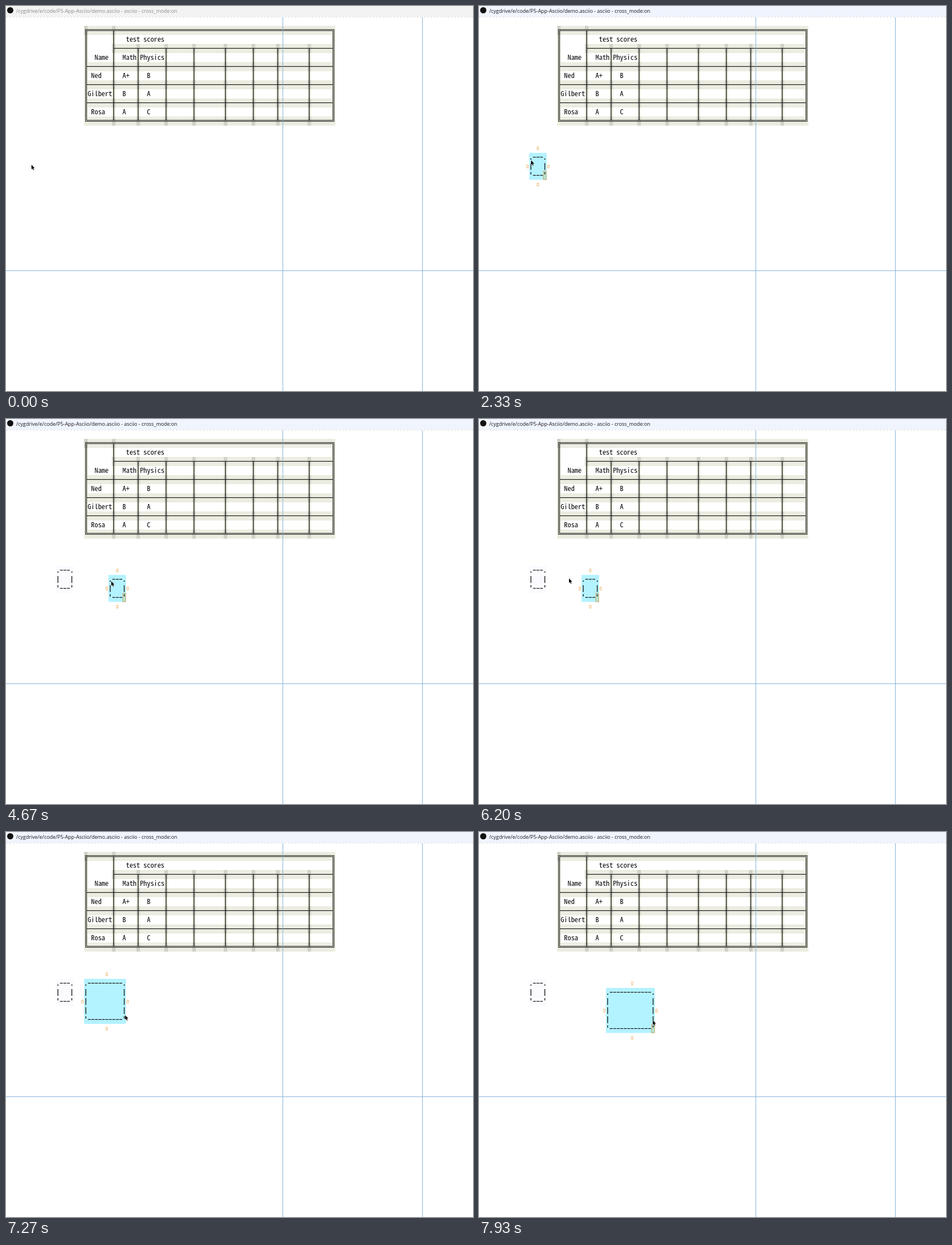
Recreate the animation shown at these times as an HTML page with a canvas. Size 825 by 679 pixels, loop 8000 ms.

```html
<!DOCTYPE html>
<html>
<head>
<meta charset="utf-8">
<style>
  html, body { margin: 0; width: 825px; height: 679px; overflow: hidden; background: #fff; }
  canvas { display: block; }
</style>
</head>
<body>
<canvas id="stage" width="825" height="679"></canvas>
<script>
const ctx = document.getElementById('stage').getContext('2d');
const CELL = 6.167, ROW = 16, LOOP = 8000, FPS = 15;
const colX = c => 2.3 + c * CELL;
const midX = c => colX(c) + CELL / 2;
const rowY = r => 35 + r * ROW;
const clamp = (v, lo, hi) => Math.min(hi, Math.max(lo, v));

// Font whose size gives the sample the wanted width
function fitFont(family, sample, width) {
  ctx.font = `100px ${family}`;
  return `${100 * width / ctx.measureText(sample).width}px ${family}`;
}
const TITLE = '/cygdrive/e/code/P5-App-Asciio/demo.asciio - asciio - cross_mode:on';
const titleFont = fitFont('"Open Sans", "Noto Sans", sans-serif', TITLE, 285);
const monoFont = fitFont('"Noto Sans Mono CJK SC", "Noto Sans Mono CJK JP", "Noto Sans Mono", monospace', '0', CELL);

function rect(color, x, y, w, h) {
  ctx.fillStyle = color;
  ctx.fillRect(x, y, w, h);
}
function frame(color, x, y, w, h) {
  ctx.strokeStyle = color;
  ctx.lineWidth = 1;
  ctx.strokeRect(x, y, w, h);
}

const COLUMNS = [22, 30, 37, 45, 53, 62, 70, 77, 86, 93];
const LABELS = [
  [34, 1, 'test scores'], [25, 3, 'Name'], [33, 3, 'Math'], [38, 3, 'Physics'],
  [24, 5, 'Ned'], [33, 5, 'A+'], [40, 5, 'B'],
  [23, 7, 'Gilbert'], [33, 7, 'B'], [40, 7, 'A'],
  [24, 9, 'Rosa'], [33, 9, 'A'], [40, 9, 'C']
];

function drawTable() {
  const right = colX(94);
  for (const r of [0, 2, 4, 6, 8, 10]) {
    const x = colX(r === 2 ? 30 : 22);
    rect('#ecece1', x, rowY(r), right - x, ROW);
  }
  COLUMNS.forEach((c, i) => {
    const top = i < 2 || i === 9 ? 0 : 2;
    rect('#ecefdf', colX(c), rowY(top), CELL, rowY(11) - rowY(top));
    if (i === 9) return;
    const crossings = i === 0 ? [0] : i === 1 ? [0, 2, 4, 6, 8, 10] : [2, 4, 6, 8, 10];
    for (const r of crossings) rect('#d0d1c5', colX(c), rowY(r), CELL, ROW);
  });
  const ink = '#1c1c1c';
  for (const d of [-1, 1]) {
    frame(ink, 141.5 + d, 43 - 0.5 + d, 437 - 2 * d, 160 - 2 * d);
  }
  for (const r of [2, 4, 6, 8]) {
    const x = r === 2 ? 190 : 142;
    rect(ink, x, rowY(r) + 7, 578 - x, 1.2);
  }
  COLUMNS.slice(1, -1).forEach((c, i) => {
    const y = i ? 74 : 44;
    rect(ink, midX(c) - 0.8, y, 1.4, 202 - y);
  });
  ctx.font = monoFont;
  ctx.fillStyle = '#000';
  for (const [c, r, text] of LABELS) ctx.fillText(text, colX(c), rowY(r) + 12);
}

function drawWindow(active) {
  rect('#fff', 0, 0, 825, 679);
  rect(active ? '#f0f4fd' : '#f3f3f3', 0, 0, 825, 19);
  for (let x = 0; x < 825; x += 6) rect('#dedede', x, 19, 3, 1);
  ctx.fillStyle = '#111';
  ctx.beginPath();
  ctx.arc(7.5, 7.5, 5.5, 0, 7);
  ctx.fill();
  ctx.font = titleFont;
  ctx.fillStyle = active ? '#1a1a1a' : '#8c8c8c';
  ctx.fillText(TITLE, 18, 12);
}

function drawGuides() {
  const blue = '#7fb0d6';
  rect(blue, 488.5, 20, 1, 659);
  rect(blue, 735.2, 20, 1, 659);
  rect(blue, 0, 466.3, 825, 1);
}

function drawBox({ c, r, w, h, selected, corner }) {
  const x = colX(c), y = rowY(r), ink = '#111';
  const last = c + w - 1, bottom = rowY(r + h - 1);
  rect(selected ? '#b3f2ff' : '#fafaff', x, y, w * CELL, h * ROW - 0.5);
  if (selected && corner) {
    rect('#b9e4d2', colX(last) + 0.5, bottom + 0.5, CELL - 1, ROW - 1);
    frame('#c4a766', colX(last) + 0.5, bottom + 0.5, CELL - 1, ROW - 1.5);
  }
  for (let i = c + 1; i < last; i++) {
    for (const top of [y, bottom]) rect(ink, colX(i) + 0.6, top + 7, 5, 1.2);
  }
  for (const edge of [c, last]) {
    const m = midX(edge) - 0.7;
    rect(ink, m - 0.2, y + 10, 1.8, 1.8);
    for (let j = 1; j < h - 1; j++) rect(ink, m, rowY(r + j) + 2, 1.3, 12);
    rect(ink, m, bottom + 2, 1.3, 4);
  }
  if (!selected) return;
  const mc = c + (w >> 1), mr = r + (h >> 1);
  for (const [hc, hr] of [[mc, r - 1], [mc, r + h], [c - 1, mr], [c + w, mr]]) {
    frame('#efbd80', midX(hc) - 1.3, rowY(hr) + 13.5 - 8, 2.6, 5);
  }
}

// Pointer path: tick, x, y
const PATH = [
  [0, 45, 280], [8, 92, 272.3], [11, 92, 272.3], [12, 92, 272], [45, 92, 272],
  [53, 191, 296], [54, 191, 296], [59, 186, 286], [78, 186, 286],
  [84, 331, 330], [89, 202, 297], [90, 202, 297], [93, 159, 281],
  [95, 158, 281], [96, 158, 281], [98, 172, 297], [101, 162, 293],
  [104, 162, 293], [110, 220, 329], [113, 193, 294], [117, 285, 324], [119, 307, 332]
];

function pointerAt(n) {
  const i = Math.max(1, PATH.findIndex(p => p[0] >= n));
  const [n0, x0, y0] = PATH[i - 1], [n1, x1, y1] = PATH[i];
  const u = (n - n0) / (n1 - n0);
  return [x0 + (x1 - x0) * u, y0 + (y1 - y0) * u];
}

const ARROW = new Path2D('M0 0V8L1.8 6.4L3.2 9.6L4.5 9L3.1 6H5.6Z');
function drawPointer([x, y]) {
  ctx.save();
  ctx.translate(x, y);
  ctx.strokeStyle = '#fff';
  ctx.lineWidth = 0.8;
  ctx.stroke(ARROW);
  ctx.fillStyle = '#000';
  ctx.fill(ARROW);
  ctx.restore();
}

function movingBox(n) {
  const grow = clamp((n - 105) / 5, 0, 1);
  const dragged = Math.round(clamp((n - 113) * 2.75, 0, 14));
  return {
    c: (n < 94 ? 29 : 22) + dragged,
    r: n < 94 || n >= 115 ? 15 : 14,
    w: 5 + Math.round(9 * grow),
    h: 3 + Math.round(2 * grow),
    selected: true,
    corner: n < 106 || n > 114
  };
}

function draw(now) {
  const n = Math.floor(((now % LOOP) + 4) * FPS / 1000) % (LOOP * FPS / 1000);
  drawWindow(n >= 5);
  drawTable();
  drawGuides();
  if (n >= 35) drawBox({ c: 14, r: 14, w: 5, h: 3, selected: n < 55, corner: true });
  if (n >= 70) drawBox(movingBox(n));
  drawPointer(pointerAt(n));
  requestAnimationFrame(draw);
}
requestAnimationFrame(draw);
</script>
</body>
</html>
```
